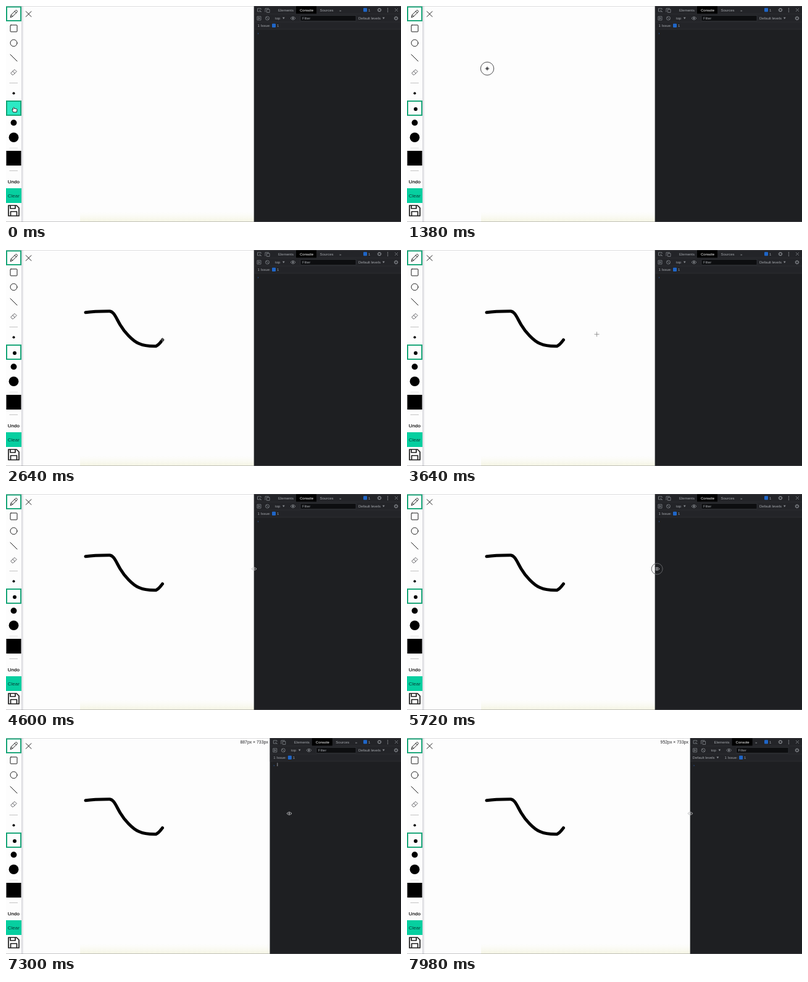
An HTML page for the animation above (8000 ms loop, 640 px wide and 352 px high).

```html
<!DOCTYPE html>
<html lang="en">
<head>
<meta charset="utf-8">
<title>Drawing board</title>
<style>
html, body { margin: 0; width: 100%; height: 100%; overflow: hidden; background: #fdfdfd; }
svg { display: block; width: 100vw; height: 100vh; }
text { font-family: "Liberation Sans", Arial, sans-serif; }
.ink { fill: none; stroke: #1c1c1c; stroke-width: 1; stroke-linecap: round; stroke-linejoin: round; }
.thin { stroke: #55555a; stroke-width: .9; }
.bold { stroke-width: 1.7; }
.rule { stroke: #b4b4b4; stroke-width: .8; }
.btn { font-size: 8px; text-anchor: middle; fill: #000; stroke: #000; stroke-width: .15; }
.ui { font-size: 6px; fill: #a2a5aa; }
.ui .on { fill: #fff; }
.icon { fill: none; stroke: #85888d; stroke-width: .8; }
.blue { fill: #1f66c8; }
.sel { fill: none; stroke: #12a475; stroke-width: 1.9; }
</style>
</head>
<body>
<svg viewBox="0 0 640 352" preserveAspectRatio="none">
  <defs>
    <linearGradient id="foot" x2="0" y2="1">
      <stop offset="0" stop-color="#fafaf0" stop-opacity="0"/>
      <stop offset="1" stop-color="#f4f4e2"/>
    </linearGradient>
    <linearGradient id="side">
      <stop offset="0" stop-color="#d2d2d8"/>
      <stop offset="1" stop-color="#fdfdfd"/>
    </linearGradient>
    <g id="badge">
      <rect class="blue" y="-3.2" width="6" height="6.2" rx="1"/>
      <text x="8" y="2">1</text>
    </g>
    <g id="gear" class="icon">
      <circle r="2.2" stroke-width="1.2"/>
      <circle r="3.1" stroke-dasharray="1 1.43"/>
    </g>
    <path id="down" d="M0-1.5h3.6L1.8 1.5z" fill="#8d9095"/>
  </defs>

  <rect width="640" height="352" fill="#fdfdfd"/>
  <rect x="120" y="335" width="520" height="17" fill="url(#foot)"/>
  <rect x="25" width="4" height="352" fill="url(#side)"/>
  <path class="ink" d="M32.3 8.8l8.6 8.6m0-8.6l-8.6 8.6"/>

  <g id="tools">
    <rect width="25" height="352" fill="#fdfdfd"/>
    <rect class="sel" x="1" y="1.5" width="23" height="22.5"/>
    <path class="ink" d="M7.2 18.2l1-3.7 7.4-7.3q1.1-.8 2.1.2t.3 2.2l-7.3 7.4zM14.2 8.7l2.6 2.6M8.2 14.5l2.6 2.5"/>
    <rect class="ink" x="7" y="31" width="11" height="11" rx="1"/>
    <circle class="ink" cx="12.5" cy="60.3" r="5.5"/>
    <path class="ink" d="M7 79l11 11"/>
    <path class="ink thin" d="M8 109l6-5.5 3.2 3.2-5.5 5.5H10.5zM10.8 106.4l3.6 3.4"/>
    <path class="rule" d="M5.5 125.5h13.5M5.5 268.5h13.5"/>
    <path class="rule" opacity=".4" d="M5.5 231.5h13.5"/>
    <circle cx="12.5" cy="142.3" r="2"/>
    <rect id="pick" class="sel" x="1" y="155" width="23" height="23"/>
    <circle id="dot" cx="14" cy="168" r="3"/>
    <circle cx="12.5" cy="190.2" r="4.9"/>
    <circle cx="12.5" cy="214.2" r="7.9"/>
    <rect x="0.5" y="236" width="24" height="24"/>
    <text class="btn" x="12.3" y="288.8">Undo</text>
    <rect y="297" width="25" height="24" fill="#06cfa0"/>
    <text class="btn" x="12.3" y="312" style="fill:#063f38;stroke:none">Clear</text>
    <path class="ink bold" d="M4 325h13l4 4v13H4zM7 325v5h8v-5M7.5 342v-7h10v7"/>
  </g>

  <path id="line" fill="none" stroke="#000" stroke-width="5" stroke-linecap="round" stroke-linejoin="round"
    d="M129 101.8C142 99.8 151 99.8 168 99.7C175 100.5 178 110 185 122C192 134 205 148 215 152.3C224 156.5 233 157 243 156.8C248 154.5 250 151 253.5 146.5"/>
  <text id="size" y="9" font-size="6.9" text-anchor="end" fill="#252528"></text>

  <g id="panel" class="ui">
    <rect id="back" y="0" height="352" fill="#1e1f22"/>
    <rect id="head" y="0" height="38" fill="#232428"/>
    <path id="rules" stroke="#303236" stroke-width=".7"/>
    <g id="left">
      <path class="icon" d="M11 9H5.5V4H11v2M8.5 6.5l3.5 3.5"/>
      <path class="icon" d="M18 10V4h6M20.5 5.5h4.5v5h-4.5z"/>
      <text x="39" y="8.7">Elements</text>
      <rect x="68" y="0" width="33" height="12.5" fill="#000"/>
      <text class="on" x="74" y="8.7">Console</text>
      <text id="sources" x="106.5" y="8.7">Sources</text>
      <text id="more" y="8.7">»</text>
      <path class="icon" d="M5 17h6v6H5zM7 18.5l2.5 1.5L7 21.5z"/>
      <path class="icon" d="M18.5 20a3 3 0 1 0 6 0a3 3 0 1 0-6 0M19.4 17.9l4.2 4.2"/>
      <text x="34" y="22">top</text>
      <use href="#down" x="46" y="20"/>
      <path class="icon" d="M59 20q4-5 8 0q-4 5-8 0z"/>
      <circle cx="63" cy="20" r="1.4" fill="#85888d"/>
    </g>
    <rect id="filter" y="15.5" height="9" fill="#0d0e10" stroke="#36383c" stroke-width=".7"/>
    <text id="hint" y="22">Filter</text>
    <g id="levels"><text y="2">Default levels</text><use href="#down" x="39"/></g>
    <g id="issue"><text y="2">1 Issue:</text><use href="#badge" x="23.5"/></g>
    <use href="#badge" x="579" y="6.5"/>
    <use href="#gear" x="605" y="6.5"/>
    <path stroke="#a2a5aa" stroke-width="1.2" stroke-dasharray="1.2 1.4" d="M618.5 3.5v7"/>
    <path class="icon" d="M630 4l5 5m0-5l-5 5"/>
    <use href="#gear" x="632" y="20"/>
    <text id="prompt" y="45.5" style="fill:#2f74d6">›</text>
    <path id="caret" stroke="#b4b6ba" stroke-width=".8" d="M0 40.5v5.5"/>
  </g>
  <path d="M0 .2h640" stroke="#8a8a8c" stroke-width=".4"/>
  <path d="M0 351.7h640" stroke="#77777a" stroke-width=".5"/>

  <g id="cursor">
    <circle id="ring" fill="none" stroke-width="1"/>
    <path id="cross" d="M-4 0h8M0-4v8" fill="none" stroke="#808080" stroke-width=".8"/>
    <circle id="grip" r="2.3" fill="#555558"/>
    <path id="hand" d="M-2.5 4L-4 0q0-1.4 1.5-.4V-3q1-1.6 2 0v1.5q1-1 1.7 0q1-.6 1.6.3q1-.3 1.2 1L3.3 4z" fill="#fff" stroke="#111" stroke-width=".9"/>
    <path id="resize" d="M-.8-3v6M.8-3v6M-2-1.9L-4 0l2 1.9M2-1.9L4 0 2 1.9" fill="none" stroke="#b8b9bc" stroke-width=".9"/>
  </g>
</svg>
<script>
const LOOP = 8000, PIXEL_RATIO = 2.074;
const $ = id => document.getElementById(id);
const set = (id, attrs) => { for (const k in attrs) $(id).setAttribute(k, attrs[k]); };
const show = (id, on) => { $(id).style.display = on ? '' : 'none'; };
const move = (id, x, y) => set(id, { transform: `translate(${x} ${y})` });
const clamp = v => Math.max(0, Math.min(1, v));
const ease = v => v * v * (3 - 2 * v);

// Eased value through [time, value] keys.
function track(t, keys) {
  let value = keys[0][1];
  for (let i = 1; i < keys.length; i++) {
    const [a, from] = keys[i - 1], [b, to] = keys[i];
    if (t >= a) value = from + (to - from) * ease(clamp((t - a) / (b - a)));
  }
  return value;
}

const line = $('line'), length = line.getTotalLength();
const drawKeys = [[1390, 0], [2500, 1]];
const edgeKeys = [[6340, 402], [6400, 403], [6700, 403], [7240, 427.8], [7540, 427.8], [7900, 459]];
const leftKeys = [[6340, 402], [6400, 405], [6700, 405], [7240, 427.8], [7540, 427.8], [7900, 458.6]];

function pointer(t, drawn) {
  if (t < 1390) return { x: track(t, [[20, 14], [820, 130]]), y: track(t, [[20, 169], [820, 102]]) };
  if (t < 3340) return line.getPointAtLength(drawn * length);
  return {
    x: track(t, [[3340, 254], [4080, 402], [5600, 402], [6400, 453], [6700, 453], [7000, 459]]),
    y: track(t, [[3340, 146], [4080, 122], [6700, 122], [7000, 123]])
  };
}

function drawPanel(t) {
  const edge = track(t, edgeKeys), left = track(t, leftKeys);
  const resizing = t >= 6360, wrapped = edge > 440;
  set('back', { x: edge, width: 640 - edge });
  set('head', { x: edge, width: 640 - edge });
  set('rules', { d: `M${edge} 13H640M${edge} 26H640M${edge} 38H640M${edge} 0V352` });
  move('left', left, 0);
  show('sources', !wrapped);
  set('more', { x: wrapped ? 105.5 : 138 });
  const start = left + 75;
  set('filter', { x: start, width: (wrapped ? 618 : 567) - start });
  set('hint', { x: start + 3 });
  if (wrapped) move('levels', left + 4, 32); else move('levels', 571, 20);
  move('issue', left + (wrapped ? 56 : 5.5), 32);
  set('prompt', { x: left + 5.5 });
  show('caret', resizing && !wrapped);
  move('caret', left + 12, 0);
  show('size', resizing);
  set('size', { x: edge - 3 });
  $('size').textContent = `${Math.round(edge * PIXEL_RATIO)}px × 733px`;
}

function drawPointer(t, drawn) {
  const p = pointer(t, drawn);
  const overTools = p.x < 25, overPanel = p.x >= 399;
  const drawRing = track(t, [[840, 0], [1120, 1], [2480, 1], [2600, 0]]);
  const dragRing = track(t, [[5020, 0], [5300, 1], [6440, 1], [6600, 0]]);
  move('cursor', p.x, p.y);
  set('ring', {
    r: overPanel ? 9 : 4 + 6.7 * drawRing,
    opacity: overPanel ? dragRing : drawRing,
    stroke: overPanel ? '#66676a' : '#4a4a4c'
  });
  show('hand', overTools);
  show('cross', !overTools && !overPanel);
  show('grip', !overPanel && drawRing > .5);
  show('resize', overPanel);
  $('pick').style.fill = overTools ? '#2ceac4' : 'none';
  show('dot', !overTools);
}

function render(t) {
  const drawn = track(t, drawKeys);
  show('line', drawn > 0);
  set('line', { 'stroke-dasharray': drawn < 1 ? `${drawn * length} ${length + 9}` : 'none' });
  drawPanel(t);
  drawPointer(t, drawn);
}

const began = performance.now();
function tick() {
  render((performance.now() - began) % LOOP);
  requestAnimationFrame(tick);
}
tick();
</script>
</body>
</html>
```
